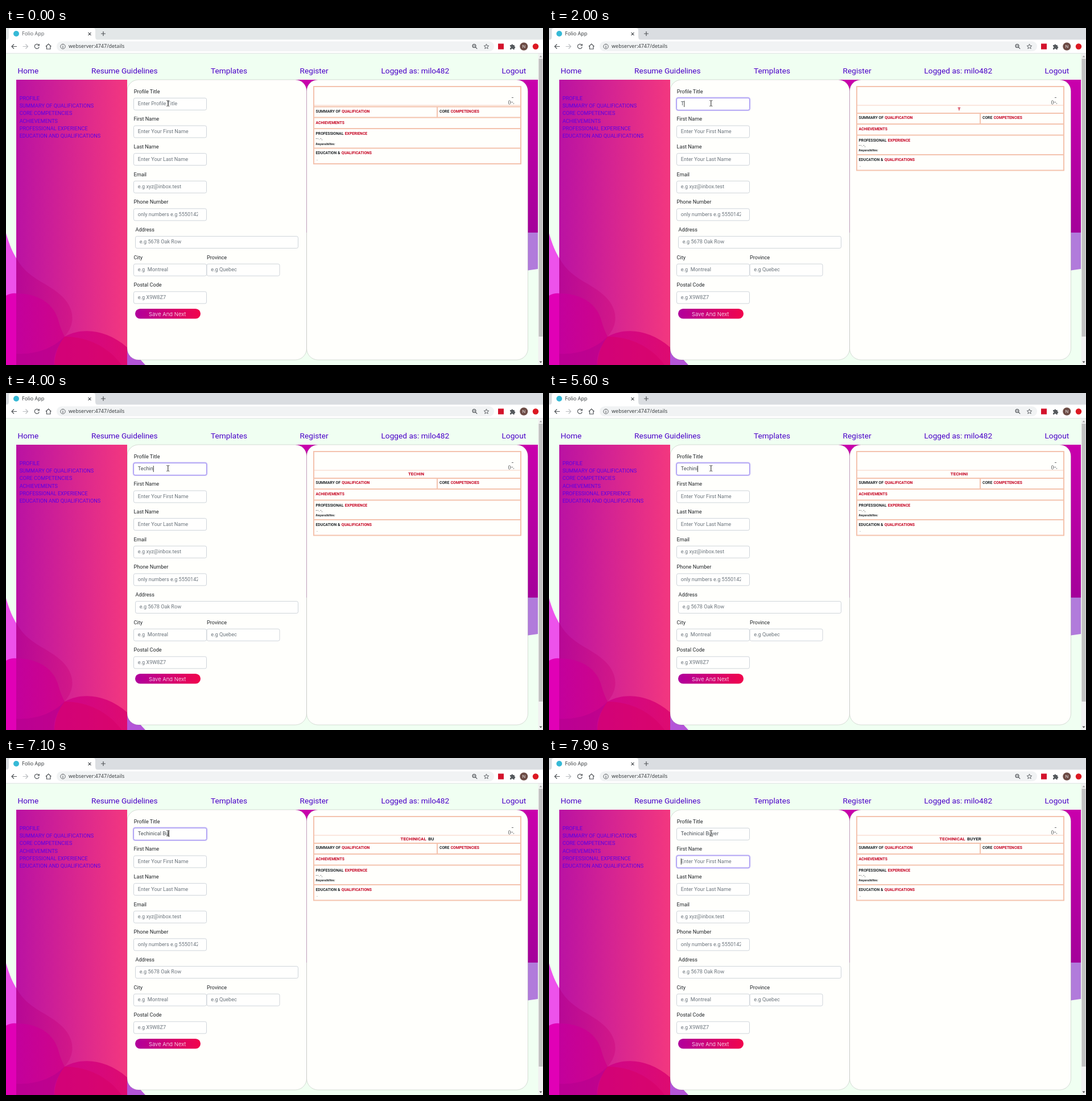
An HTML page that plays this animation: 944x593 px, repeating every 8 s.

```html
<!DOCTYPE html>
<html lang="en">
<head>
<meta charset="utf-8">
<title>Profile form</title>
<style>
  html, body { margin: 0; width: 100%; height: 100%; overflow: hidden; background: #f0fff2; }
  svg { display: block; width: 100vw; height: 100vh; }
  text { font: 9.15px Roboto, sans-serif; fill: #212529; white-space: pre; }
  .chrome text { font: 9px "Noto Sans", sans-serif; fill: #3c4043; }
  .line { fill: none; stroke: #505458; stroke-width: 1.2; }
  .nav text { font-size: 13.7px; fill: #4a00c8; }
  .side text { fill: #5b00e6; }
  .hint { fill: #6c757d; }
  .resume text { font-size: 6.75px; font-weight: 700; }
  .resume .red { fill: #c4001f; }
  .resume #title { font-size: 7.95px; text-anchor: middle; }
  .resume .tiny { font-size: 4.7px; font-style: italic; }
  .rule { fill: none; stroke: #f4c3ae; stroke-width: 2; }
  .save { font: 300 9.5px Inter, sans-serif; fill: #fff; }
</style>
</head>
<body>
<svg id="stage" viewBox="0 0 944 593">
  <defs>
    <linearGradient id="pink"><stop stop-color="#ba12a3"/><stop offset="1" stop-color="#f3377f"/></linearGradient>
    <linearGradient id="wine" x2="0" y2="1"><stop stop-color="#c900ac"/><stop offset="1" stop-color="#a4009a"/></linearGradient>
    <linearGradient id="hot"><stop stop-color="#b1009c"/><stop offset="1" stop-color="#f1054c"/></linearGradient>
    <linearGradient id="deep"><stop stop-color="#c3009c"/><stop offset="1" stop-color="#de0b70"/></linearGradient>
    <linearGradient id="plum"><stop stop-color="#b70896"/><stop offset="1" stop-color="#d21888"/></linearGradient>
    <clipPath id="bar"><rect x="18" y="91" width="195" height="502"/></clipPath>
    <clipPath id="phone"><rect x="230" y="318" width="107.5" height="20"/></clipPath>
  </defs>

  <g class="chrome">
    <rect id="strip" width="944" height="21"/>
    <path d="M0 21Q5 21 5 15V4Q5 0 9 0H153Q157 0 157 4V15Q157 21 162 21Z" fill="#fff"/>
    <rect y="20.5" width="944" height="24" fill="#fff"/>
    <rect x="89" y="23.5" width="769" height="17.5" rx="8.7" fill="#f1f3f4"/>
    <path d="M0 44.5H944" stroke="#dfe2e3"/>
    <circle cx="18" cy="10" r="5" fill="#35b9d6"/>
    <text id="tab" x="28" y="13.2">Folio App</text>
    <text x="110" y="35.4">webserver:4747/details</text>
    <path class="line" d="M144.500 7.800l5 5m0-5l-5 5M167 10h8m-4-4v8"/>
    <path class="line" d="M19 32.500h-9m4-4l-4 4l4 4"/>
    <path class="line" d="M29.500 32.500h9m-4-4l4 4l-4 4" style="stroke:#b9bcbf"/>
    <path class="line" d="M57.500 29.800A4 4 0 1 0 58.200 33.500M58.300 28v3h-3"/>
    <path class="line" d="M70 32.500l4.700-4.500l4.700 4.500M71.500 32v5h6.400v-5"/>
    <circle class="line" cx="100" cy="32.500" r="4.200" style="stroke-width:.9"/>
    <path class="line" d="M100 32v3M100 29.700v1"/>
    <circle class="line" cx="823" cy="31.500" r="2.900"/>
    <path class="line" d="M825.200 33.700l3 3M821.700 31.500h2.700"/>
    <path class="line" style="stroke-width:.9" d="M844.500 28.200l1.200 2.900l3.100.2l-2.400 2l.8 3l-2.700-1.600l-2.700 1.600l.8-3l-2.400-2l3.100-.2z"/>
    <rect x="865" y="27.500" width="10" height="10" fill="#d3132c"/>
    <path fill="#55595d" d="M886 30h2.300a1.500 1.500 0 1 1 3 0h2.500v2.500a1.500 1.500 0 1 1 0 3v2.300h-2.500a1.500 1.500 0 0 0-3 0H886v-2.500a1.500 1.500 0 0 0 0-3z"/>
    <circle cx="910.300" cy="32.500" r="7" fill="#6d4c46"/>
    <text x="907.600" y="35.300" style="font-size:7.500px;fill:#fff">N</text>
    <circle cx="931" cy="32.500" r="5.200" fill="#dc1822"/>
  </g>

  <rect y="45" width="936" height="548" fill="#f0fff2"/>
  <path d="M490 91H935V360H490Z" fill="url(#wine)"/>
  <path d="M900 360H935V424L900 429Z" fill="#b17bdb"/>
  <path d="M0 361C6 382 12 395 18 405V593H0Z" fill="#ed52eb"/>
  <path d="M0 471Q9 466 18 467V593H0Z" fill="#e100b6"/>
  <path d="M213 562Q228 574 245 593H213Z" fill="#b455d8"/>
  <g clip-path="url(#bar)">
    <path d="M18 91H213V593H18Z" fill="url(#pink)"/>
    <path d="M18 404C36 440 70 447 94 468C119 489 125 518 103 543L60 593H18Z" fill="url(#plum)"/>
    <path d="M18 467C56 467 82 484 91 511Q96 530 103 543C135 526 177 531 213 562V593H18Z" fill="url(#deep)"/>
    <path d="M18 573C52 575 82 564 103 543C88 565 83 578 85 593H18Z" fill="#b4008e" opacity=".55"/>
    <path d="M103 543C144 543 181 562 203 593H85Q87 563 103 543Z" fill="#d80068" opacity=".55"/>
  </g>

  <g fill="#fffffc" stroke="#000" stroke-opacity=".14">
    <rect x="213" y="91" width="315.500" height="493" rx="20"/>
    <rect x="528.500" y="91" width="389" height="493" rx="20"/>
  </g>

  <rect x="935.500" y="45" width="9" height="548" fill="#f1f1f1"/>
  <rect x="936.500" y="54" width="7" height="489" fill="#c1c1c1"/>
  <path d="M937.500 51.500l2.500-3l2.500 3z" fill="#a3a3a3"/>
  <path d="M937.500 586.500l2.500 3l2.500-3z" fill="#505050"/>

  <g class="nav" id="nav"></g>
  <g class="side" id="side"></g>
  <g id="form"></g>
  <rect x="227" y="494" width="115" height="17.500" rx="8.700" fill="url(#hot)"/>
  <text class="save" x="251" y="506.600">Save And Next</text>

  <g class="resume">
    <rect class="rule" id="frame" x="541" y="103" width="364" height="136"/>
    <path class="rule" style="stroke-width:.8" d="M541 136H905"/>
    <text x="888.500" y="124" style="font-size:6px">–</text>
    <text x="882.500" y="132.800" style="font-size:7px;font-weight:400">()–,</text>
    <text id="title" y="145"><tspan class="red" id="first"></tspan><tspan id="second" dx="1.500"></tspan></text>
    <g id="rows">
      <path class="rule" d="M541 138.500H905M541 157.500H905M541 177H905M541 211.500H905M758 138.500V157.500"/>
      <text class="tiny" x="544.500" y="197">• • . • ,</text>
      <text class="tiny" x="544.500" y="205.800">Responsibilities:</text>
      <text x="546" y="232.500" style="fill:#888">.</text>
    </g>
  </g>

  <path id="caret" stroke="#222" stroke-width=".9"/>
  <path fill="none" stroke="#222" d="M282.500 127.500q2 0 2.300 1q.3-1 2.300-1M284.800 128.500v8M282.500 137.500q2 0 2.300-1q.3 1 2.300 1"/>
</svg>
<script>
const $ = id => document.getElementById(id);

function add(parent, tag, attrs, text = '') {
  const node = document.createElementNS('http://www.w3.org/2000/svg', tag);
  for (const key in attrs) node.setAttribute(key, attrs[key]);
  node.textContent = text;
  return $(parent).appendChild(node);
}

[[20.5, 'Home'], [150, 'Resume Guidelines'], [360, 'Templates'], [516.5, 'Register'],
 [659.5, 'Logged as: milo482'], [871.5, 'Logout']]
  .forEach(([x, s]) => add('nav', 'text', { x, y: 80 }, s));

['PROFILE', 'SUMMARY OF QUALIFICATIONS', 'CORE COMPETENCIES', 'ACHIEVEMENTS',
 'PROFESSIONAL EXPERIENCE', 'EDUCATION AND QUALIFICATIONS']
  .forEach((s, i) => add('side', 'text', { x: 23.7, y: 126.7 + i * 13.3 }, s));

// Each field: row, label, placeholder, left edge, width
const fields = [
  [0, 'Profile Title', 'Enter Profile Title'],
  [1, 'First Name', 'Enter Your First Name'],
  [2, 'Last Name', 'Enter Your Last Name'],
  [3, 'Email', 'e.g xyz@inbox.test'],
  [4, 'Phone Number', 'only numbers e.g 5550142'],
  [5, 'Address', 'e.g 5678 Oak Row', 227.5, 286],
  [6, 'City', 'e.g  Montreal'],
  [6, 'Province', 'e.g Quebec', 353],
  [7, 'Postal Code', 'e.g X9W8Z7'],
].map(([row, label, hint, x = 224.5, width = 128]) => {
  const y = 123.3 + row * 48.65;
  const box = { x, y, width, height: 21, rx: 2.7 };
  add('form', 'text', { x: row ? x : 224.7, y: y - 8.7 }, label);
  const ring = add('form', 'rect', { ...box, fill: 'none', stroke: '#6a50ee', 'stroke-width': 3.6, opacity: 0 });
  const border = add('form', 'rect', { ...box, fill: '#fffffe', stroke: '#ced4da' });
  const value = add('form', 'text', { class: 'hint', x: x + 7.3, y: y + 12.9 }, hint);
  if (row === 4) value.setAttribute('clip-path', 'url(#phone)');
  return { ring, border, value, hint, y };
});

[[544.5, 148.7, 'SUMMARY OF', 590.3, 'QUALIFICATION'], [762, 148.7, 'CORE', 781.7, 'COMPETENCIES'],
 [0, 168.5, '', 544.5, 'ACHIEVEMENTS'], [544.5, 188, 'PROFESSIONAL', 595.8, 'EXPERIENCE'],
 [544.5, 222, 'EDUCATION &', 589.8, 'QUALIFICATIONS']]
  .forEach(([x, y, dark, redX, red]) => {
    add('rows', 'text', { x, y }, dark);
    add('rows', 'text', { x: redX, y, class: 'red' }, red);
  });

const typing = [
  [0, ''], [2000, 'T'], [2600, 'Te'], [2800, 'Tec'], [3000, 'Tech'], [3300, 'Techin'],
  [3500, 'Techinc'], [4000, 'Techin'], [4600, 'Techinc'], [5200, 'Techin'], [5600, 'Techini'],
  [5800, 'Techinica'], [6000, 'Techinical'], [6200, 'Techinical '], [6700, 'Techinical B'],
  [7100, 'Techinical Bu'], [7200, 'Techinical Buy'], [7300, 'Techinical Buye'], [7500, 'Techinical Buyer'],
];
const between = (t, a, b) => t >= a && t < b;
const fade = (t, start) => Math.min(1, Math.max(0, (t - start + 60) / 200));

function setFocus({ ring, border }, k) {
  ring.setAttribute('opacity', 0.36 * k);
  border.setAttribute('stroke', `rgb(${206 - 44 * k},${212 - 66 * k},${218 + 24 * k})`);
}

function draw(now) {
  const t = Math.floor(now % 8000 / 100) * 100;
  const text = typing.findLast(([start]) => start <= t)[1];
  const [title, name] = fields;
  const active = t >= 1000;
  const moved = t >= 7700;

  $('strip').setAttribute('fill', active ? '#dadde1' : '#e3e7e8');
  $('tab').style.fill = active ? '#3c4043' : '#65696d';

  title.value.textContent = text || title.hint;
  title.value.style.fill = text ? '#495057' : '';
  setFocus(title, fade(t, 1000) - fade(t, 7700));
  setFocus(name, fade(t, 7700));

  const [first, second = ''] = text.toUpperCase().trim().split(' ');
  $('first').textContent = first;
  $('second').textContent = second && ' ' + second;
  $('title').setAttribute('x', second ? 723 : 721);
  const drop = text ? 11.5 : 0;
  $('rows').setAttribute('transform', `translate(0 ${drop})`);
  $('frame').setAttribute('height', 136 + drop);

  const typed = text && !moved ? title.value.getComputedTextLength() : 0;
  const y = (moved ? name : title).y + 4.7;
  const shown = active && !between(t, 1600, 2000) && !between(t, 4300, 4600);
  $('caret').setAttribute('d', shown ? `M${232.3 + typed} ${y}v11` : '');
}

const begin = performance.now();
(function loop() {
  draw(performance.now() - begin);
  requestAnimationFrame(loop);
})();
</script>
</body>
</html>
```
